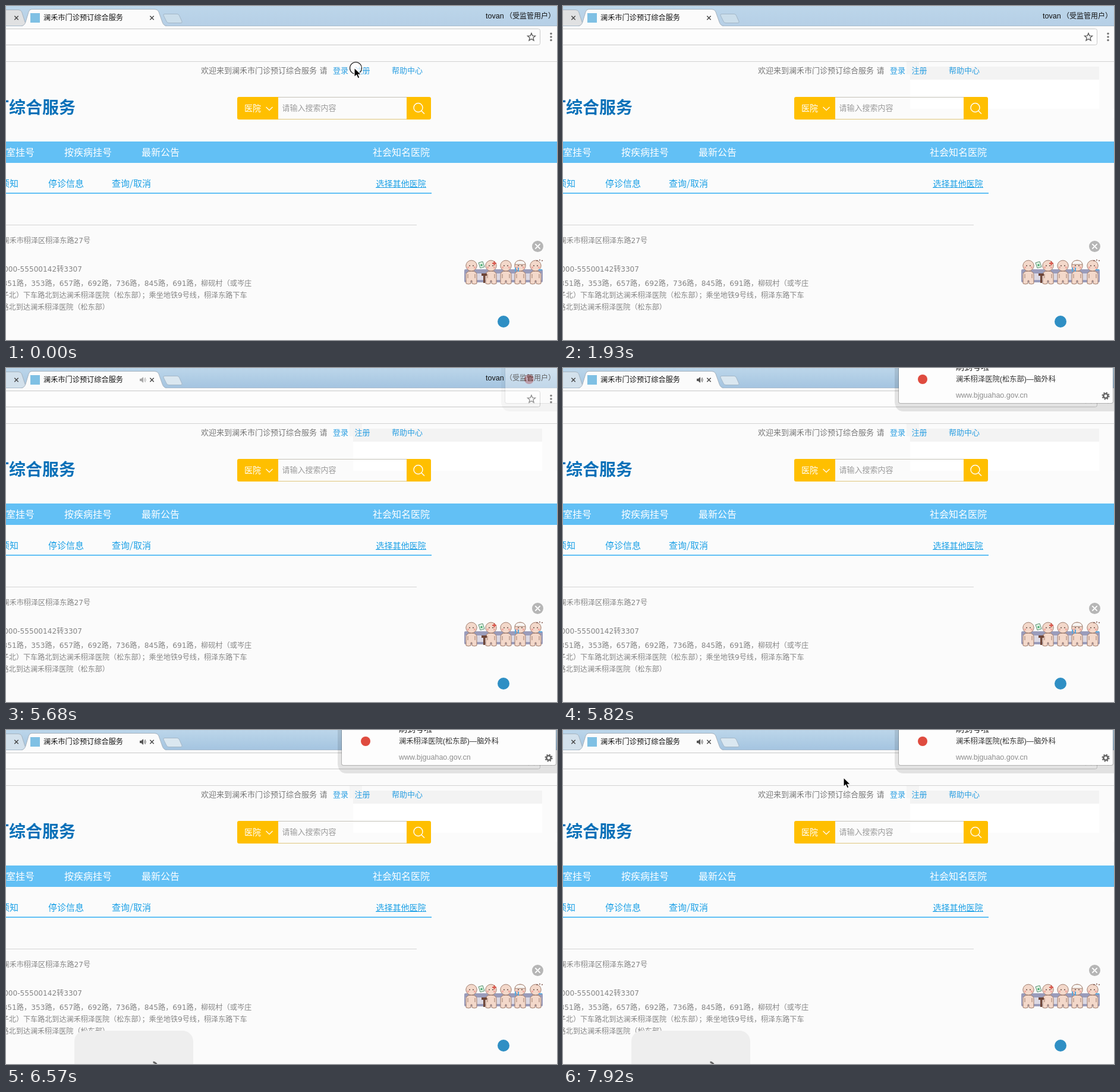
An HTML page for the animation above (8 s loop, 927 by 562 pixels).

```html
<!DOCTYPE html>
<html lang="zh-CN">
<head>
<meta charset="utf-8">
<style>
html, body { margin: 0; width: 100%; height: 100%; overflow: hidden; background: #fbfbfb; }
svg { display: block; width: 927px; height: 562px; }
text { font: 13px "Liberation Sans", "Noto Sans CJK SC", "Noto Sans CJK", sans-serif; white-space: pre; }
.ui { font-size: 12.2px; fill: #111; }
.grey { fill: #777; }
.link { fill: #2b9fe2; }
.nav { font-size: 16px; fill: #fff; }
.sub { font: 15px "Noto Sans CJK SC", "Noto Sans CJK", sans-serif; fill: #1ba0e6; }
.info { font: 12.1px "DejaVu Sans", "Noto Sans CJK SC", "Noto Sans CJK", sans-serif; fill: #858585; }
.brand { font-size: 28px; font-weight: 700; fill: #0870b8; text-anchor: end; }
.line { fill: none; }
</style>
</head>
<body>
<svg viewBox="0 0 927 562">
  <defs>
    <linearGradient id="strip" x1="0" y1="0" x2="0" y2="1">
      <stop offset="0" stop-color="#bcd6ea"/>
      <stop id="stripEnd" offset="1" stop-color="#b6cfe6"/>
    </linearGradient>
    <path id="cross" class="line" d="M-3.2 -3.2L3.2 3.2M3.2 -3.2L-3.2 3.2"/>
    <g id="kid">
      <path d="M-9 30V17Q-10 9 0 9Q10 9 9 17V30Q5 32 1 30V25H-1V30Q-5 32 -9 30Z"/>
      <ellipse rx="9.2" ry="9"/>
      <path class="line" d="M-6 14V21M6 14V21"/>
      <g stroke="none">
        <circle cx="-3" cy="0" r=".9" fill="#5b4038"/>
        <circle cx="3" cy="0" r=".9" fill="#5b4038"/>
        <circle cx="-5.5" cy="3" r="1.8" fill="#f0aaa0"/>
        <circle cx="5.5" cy="3" r="1.8" fill="#f0aaa0"/>
      </g>
    </g>
  </defs>

  <rect width="927" height="562" fill="#fbfbfb"/>

  <!-- browser bar -->
  <rect width="927" height="34" fill="url(#strip)"/>
  <path id="oldTab" d="M-5 6.5H21Q25 6.5 26.500 10L32 27Q34 33 38 33.500H-5Z" fill="#e0e1e2" stroke="#a6b3bf"/>
  <path d="M0 33.500H927" stroke="#a9bccd"/>
  <path d="M26 34Q31 33 33 27L38 10Q39.500 6 43 6H250Q255 6 257 10L263 27Q265 33 270 34V35H26Z" fill="#fbfbfb"/>
  <path class="line" d="M26 33.500Q31 33 33 27L38 10Q39.500 5.500 43 5.500H250Q255 5.500 257 10L263 27Q265 33 270 33.500" stroke="#a6b3bf"/>
  <path id="newTab" d="M267 13.500H288Q290.500 13.500 291.500 16L296 26Q297 28.500 294 28.500H274Q271 28.500 270 26L265 16Q264 13.500 267 13.500Z" fill="#cbdeeb" stroke="#a3b7c8"/>
  <use href="#cross" x="17.500" y="20" stroke="#444" stroke-width="1.400"/>
  <use href="#cross" x="245.500" y="20" stroke="#444" stroke-width="1.400"/>
  <rect x="41" y="12" width="16" height="16" fill="#7fc0e4"/>
  <text id="title" class="ui" x="63" y="24.200">澜禾市门诊预订综合服务</text>
  <g id="sound">
    <path d="M225 18H227.500L231 15V25L227.500 22H225Z"/>
    <path class="line" d="M232.500 17.500Q234 20 232.500 22.500M234 16Q236.500 20 234 24" stroke="#555" stroke-width=".9"/>
  </g>
  <text class="ui" x="807" y="21" style="font-size:12.600px">tovan</text>
  <text class="ui" x="840" y="20.800" style="font-size:12px">（受监管用户）</text>
  <rect x="-5" y="38.500" width="903.500" height="27" rx="3" fill="#fdfdfd" stroke="#c9c9c9"/>
  <path class="line" id="star" stroke="#555" stroke-width="1.300"/>
  <g id="dots"><circle cx="917" cy="46.500" r="1.800"/><circle cx="917" cy="52" r="1.800"/><circle cx="917" cy="57.500" r="1.800"/></g>
  <path d="M0 93.500H927" stroke="#d2d2d2"/>

  <!-- traces left behind by the pointer -->
  <rect id="trace1" x="578" y="94" width="21" height="21" fill="#f5f5f5"/>
  <g id="trace2">
    <rect x="584" y="102" width="318" height="22" fill="#f3f3f3"/>
    <rect x="584" y="124" width="318" height="49" fill="#fff"/>
  </g>
  <rect id="trace3" x="925" y="173" width="2" height="15" fill="#fff"/>

  <!-- page head -->
  <text class="grey" x="328" y="113">欢迎来到澜禾市门诊预订综合服务</text>
  <text class="grey" x="527.500" y="113">请</text>
  <text class="link" x="550" y="113">登录</text>
  <text class="link" x="586.500" y="113">注册</text>
  <text class="link" x="649" y="113">帮助中心</text>
  <text class="brand" x="117" y="180.500">门诊预订综合服务</text>

  <path d="M458 153.500H674" stroke="#c4c1b8"/>
  <path d="M458 190.500H674" stroke="#dfc67c"/>
  <path d="M392 153H458V191H392Q389 191 389 188V156Q389 153 392 153Z" fill="#ffbf00"/>
  <path d="M674 153H712Q715 153 715 156V188Q715 191 712 191H674Z" fill="#ffbf00"/>
  <text x="401" y="177" fill="#fff" style="font-size:14px;font-weight:500">医院</text>
  <g class="line" stroke="#fff">
    <path d="M437.500 170L443 175.500L448.500 170" stroke-width="1.200"/>
    <circle cx="693.500" cy="171" r="7.500" stroke-width="1.400"/>
    <path d="M699 176.500L704 181.500" stroke-width="1.400"/>
  </g>
  <text x="464.500" y="176" fill="#9a9a9a">请输入搜索内容</text>

  <rect y="228" width="927" height="36" fill="#62c0f5"/>
  <text class="nav" x="0" y="252">室挂号</text>
  <text class="nav" x="98" y="252">按疾病挂号</text>
  <text class="nav" x="228" y="252">最新公告</text>
  <text class="nav" x="617" y="252">社会知名医院</text>

  <text class="sub" x="21" y="303.700" text-anchor="end">预约须知</text>
  <text class="sub" x="71" y="303.700">停诊信息</text>
  <text class="sub" x="178" y="303.700">查询/取消</text>
  <text class="sub" x="622.500" y="303.500" style="font-size:14px">选择其他医院</text>
  <path d="M622 305.500H707" stroke="#1ba0e6"/>
  <rect y="314" width="716" height="2" fill="#62c0f5"/>
  <path d="M0 368.500H691" stroke="#d4d4d4"/>

  <text class="info" x="142" y="399" text-anchor="end">澜禾市栩泽区栩泽东路27号</text>
  <text class="info" x="128" y="446.700" text-anchor="end">000-55500142转3307</text>
  <text class="info" x="-5.500" y="471" style="font-size:12.200px">351路，353路，657路，692路，736路，845路，691路，柳砚村（或岑庄</text>
  <text class="info" x="-7.300" y="491">子北）下车路北到达澜禾栩泽医院（松东部）；乘坐地铁9号线，栩泽东路下车</text>
  <text class="info" x="-7.500" y="511">路北到达澜禾栩泽医院（松东部）</text>

  <!-- side panel -->
  <circle cx="894.500" cy="404.500" r="9.500" fill="#b6b6b6"/>
  <use href="#cross" transform="translate(894.500 404.500) scale(1.300)" stroke="#fff" stroke-width="1.500"/>
  <rect x="771" y="443" width="132" height="22" rx="2" fill="#9a9cbb"/>
  <rect x="773" y="450" width="128" height="11" fill="#dcd9e4"/>
  <g id="kids" fill="#f3d8ca" stroke="#a07c6c" stroke-width="1"></g>
  <path d="M795 432L802 430L805 439L798 441Z" fill="#dff2e2" stroke="#5d8f72"/>
  <circle cx="800" cy="436" r="1.800" fill="#48a870"/>
  <path d="M818 433H825M821.500 429.500V436.500" stroke="#d8574d" stroke-width="2.200"/>
  <path d="M800 450H809V454H806V466H803V454H800Z" fill="#6e4638"/>
  <path d="M856 435Q857 428 865 428Q873 428 874 435Z" fill="#f8f5f2" stroke="#a07c6c"/>
  <path d="M857 440V447M862 440V447M896 444H902" stroke="#58a8dd" stroke-width="2"/>
  <path d="M892 428.500H895M897 427.500H899M901 428.500H903" stroke="#7c5146" stroke-width="1.500"/>
  <circle cx="837" cy="531" r="10" fill="#2f8fc4"/>

  <!-- volume panel -->
  <g id="volume">
    <rect x="115" y="506" width="200" height="90" rx="18" fill="#eee"/>
    <path class="line" d="M247.500 559Q251.500 559 254 564" stroke="#666" stroke-width="3"/>
  </g>

  <!-- notification -->
  <g id="note">
    <path d="M-7 -20V58Q-5 73 8 73H380V-20Z" fill="#000" opacity=".1"/>
    <rect x="-1" y="-20" width="362" height="80" rx="4" fill="#000" opacity=".22"/>
    <rect y="-20" width="360" height="79" rx="3" fill="#fdfdfd"/>
    <circle cx="40" cy="19" r="8" fill="#df4b3f"/>
    <text x="96" y="3" fill="#222" style="font-size:14px">刷到号啦</text>
    <text x="96" y="23" fill="#333" style="font-size:12.300px">澜禾栩泽医院(松东部)—脑外科</text>
    <text x="96" y="50" fill="#8c8c8c" style="font-size:12.500px">www.bjguahao.gov.cn</text>
    <g class="line" stroke="#666">
      <circle cx="348" cy="47" r="3.700" stroke-width="2.600"/>
      <circle cx="348" cy="47" r="5.600" stroke-width="2" stroke-dasharray="2.200"/>
    </g>
  </g>

  <circle id="ring" cx="588.500" cy="104.500" r="10" fill="#fff" fill-opacity=".7" stroke="#111" stroke-width="1.200"/>
  <path id="pointer" d="M0 0V15.500L3.700 12.200L6.200 17.700L8.900 16.500L6.500 11.200H11.300Z" fill="#000" stroke="#fff" stroke-width="1.100"/>
</svg>
<script>
const LOOP = 8000;
const $ = id => document.getElementById(id);
const show = (id, on) => $(id).setAttribute('visibility', on ? 'visible' : 'hidden');
const fill = (id, color) => $(id).setAttribute('fill', color);

// pointer visits: start, end, x, y
const visits = [
  [0, 290, 586, 104],
  [290, 440, 890, 155],
  [1190, 1340, 927, 174],
  [1780, 1930, 642, -16],
  [7920, LOOP, 472, 80]
];

const starPoints = Array.from({ length: 10 }, (_, i) => {
  const r = i % 2 ? 3 : 6.8, a = i * Math.PI / 5;
  return (884 + r * Math.sin(a)).toFixed(1) + ' ' + (52.5 - r * Math.cos(a)).toFixed(1);
});
$('star').setAttribute('d', 'M' + starPoints.join('L') + 'Z');

$('kids').innerHTML = [783, 816, 841, 865, 891]
  .map(x => `<use href="#kid" x="${x}" y="437"/>`).join('');

function draw(t) {
  const active = t >= 5080;
  $('stripEnd').setAttribute('stop-color', active ? '#a4c4e0' : '#b6cfe6');
  fill('oldTab', active ? '#d3e1ec' : '#e0e1e2');
  fill('newTab', active ? '#dae7f0' : '#cbdeeb');
  fill('dots', active ? '#484848' : '#777');

  show('ring', t < 150);
  show('trace1', t >= 150);
  show('trace2', t >= 290);
  show('trace3', t >= 1340);

  const entering = t < 5820;
  show('note', t >= 5680);
  $('note').setAttribute('transform', `translate(${entering ? 840 : 565} 0)`);
  $('note').setAttribute('opacity', entering ? 0.33 : 1);
  show('sound', t >= 5680);
  $('sound').setAttribute('opacity', entering ? 0.5 : 1);
  fill('sound', '#555');

  const blank = (t >= 5970 && t < 6570) || (t >= 7020 && t < 7470);
  show('title', !blank);
  show('volume', t >= 6420);

  const visit = visits.find(([from, to]) => t >= from && t < to);
  show('pointer', visit);
  if (visit) $('pointer').setAttribute('transform', `translate(${visit[2]} ${visit[3]})`);
}

const start = performance.now();
function tick() {
  draw((performance.now() - start) % LOOP);
  requestAnimationFrame(tick);
}
tick();
</script>
</body>
</html>
```
